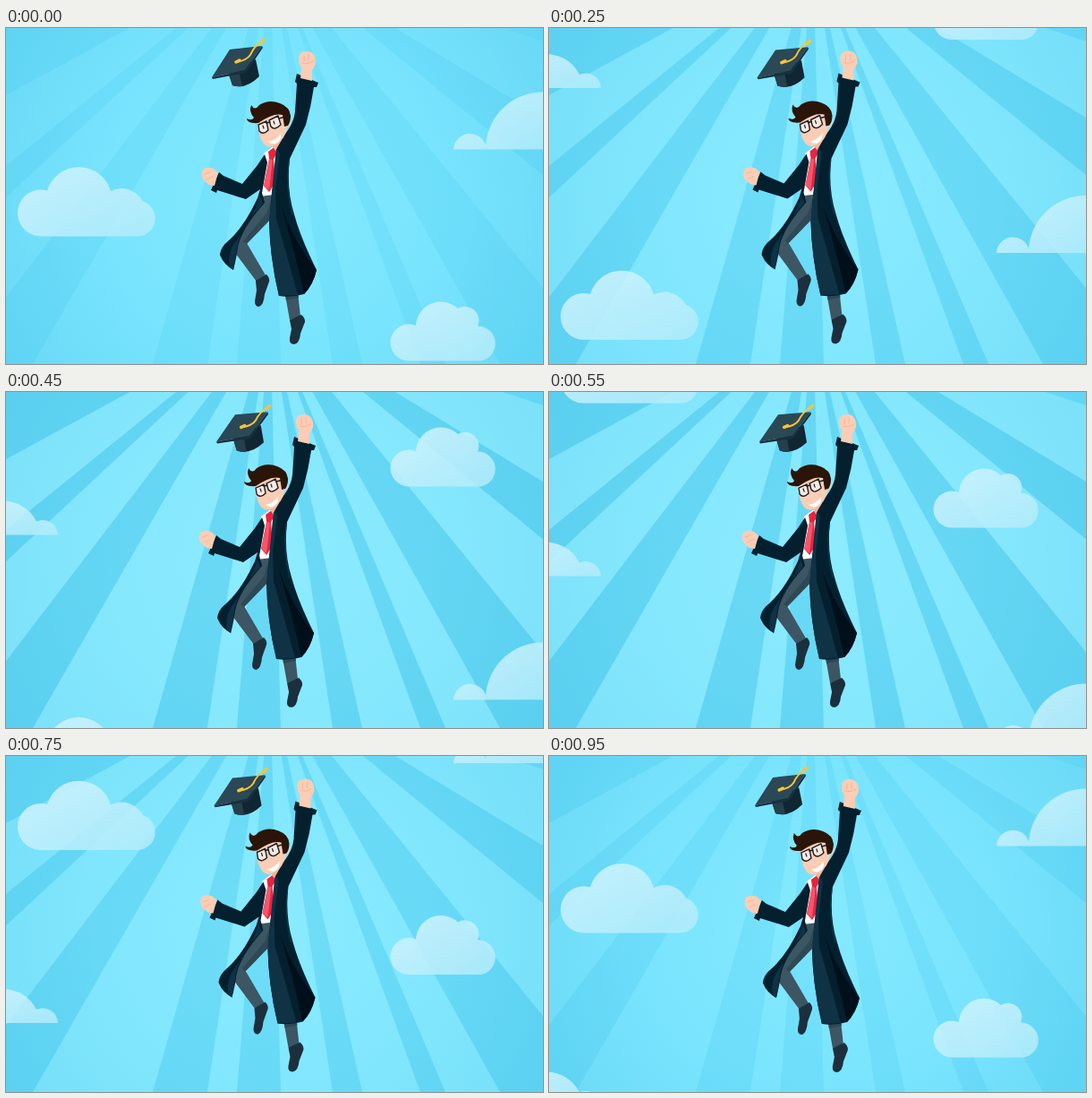
These frames come from a looping animation (600x375 px, 1000 ms). An HTML page:

```html
<!DOCTYPE html>
<html lang="en">
<head>
<meta charset="utf-8">
<title>Graduate</title>
<style>
html, body { margin: 0; width: 100%; height: 100%; overflow: hidden; background: #6bdcfa; }
svg { display: block; width: 100vw; height: 100vh; }
.coat { fill: #04202f; }
.fold { fill: #0f3245; }
.deep { fill: #010f1b; }
.skin { fill: #fbcdb5; }
.shade { fill: #f0b79d; }
.trouser { fill: #3d5664; }
.trouser-dark { fill: #2f4855; }
.shoe { fill: #1b2f3d; }
.hair { fill: #2b1508; }
.line { fill: none; stroke-linecap: round; stroke-linejoin: round; }
</style>
</head>
<body>
<svg viewBox="0 0 600 375" preserveAspectRatio="none">
  <defs>
    <radialGradient id="sky" gradientUnits="userSpaceOnUse" cx="300" cy="190" r="370">
      <stop offset="0" stop-color="#80e8ff"/>
      <stop offset=".5" stop-color="#73e2fd"/>
      <stop offset="1" stop-color="#60d4f4"/>
    </radialGradient>
    <linearGradient id="mist" x1="0" y1="0" x2="1" y2="1">
      <stop offset="0" stop-color="#d4f4fd"/>
      <stop offset="1" stop-color="#b0ebfb"/>
    </linearGradient>
  </defs>
  <rect width="600" height="375" fill="url(#sky)"/>
  <g id="rays"></g>

  <!-- each cloud rests on y = 0 -->
  <g fill="url(#mist)" fill-opacity=".86">
    <path class="cloud" data-y="232.5" d="M38 0A26 26 0 1 1 46-51A37 37 0 0 1 117-50.500A27 27 0 0 1 153-39A20 20 0 0 1 147 0Z"/>
    <path class="cloud" data-y="371.5" d="M450 0A20.500 20.500 0 1 1 458-39.400A28 28 0 0 1 505-58.500A15.500 15.500 0 0 1 527-38.800A19.500 19.500 0 0 1 530 0Z"/>
    <path class="cloud" data-y="135.500" d="M500 0A18.500 18.500 0 0 1 536-5A64 64 0 0 1 601-64V0Z"/>
    <path class="cloud" data-y="-48.500" d="M-42 0A40 40 0 0 1 34-15A17 17 0 0 1 58 0Z"/>
  </g>

  <g id="man">
    <!-- legs -->
    <path class="trouser" d="M284 185L299 184L298 210L269 240L290 276L280 283L256 251Q267 216 284 185Z"/>
    <path class="trouser-dark" d="M297 188L299 210L269 241L265 238L291 207Z"/>
    <path class="shoe" d="M279 282L291 275Q295 279 294 283L289 297Q288 309 283 311Q278 311 278 305L280 293Z"/>
    <path class="trouser" d="M312 298L326 295L329 322L317 326Z"/>
    <path class="trouser-dark" d="M312 298L326 295L327 301L313 304Z"/>
    <path class="shoe" d="M317 326L330 320Q334 323 334 328L329 341Q328 352 322 353Q316 353 317 346L319 336Z"/>
    <!-- shirt and tie -->
    <path fill="#fff" d="M288 140L304 128L300 186L283 188Z"/>
    <path fill="#e8243f" d="M293 138L301 132L302 141L299 146L301 172L294 183L288 176L294 146Z"/>
    <path fill="#f4566a" d="M294 146L298 147L294 181L288 176Z"/>
    <!-- left flap and arm -->
    <path class="coat" d="M289 141L292 150L286 184L289 195Q263 224 259 245Q257 259 254 270Q243 264 239 253Q240 244 249 237Q266 222 281 190L284 180L268 191L236 181L235 184L229 181L238 161L243 165L264 174L281 153Z"/>
    <path class="fold" d="M284 188L287 196Q261 224 258 245L254 270L250 267Q247 252 256 239Q275 215 284 188Z"/>
    <path class="skin" d="M237 161L233 176L227 175L221 170Q217 165 220 158Q224 154 232 157Z"/>
    <path class="line" stroke="#f0b79d" stroke-width="1" d="M222 163L228 161M224 169L230 166"/>
    <!-- main coat and raised arm -->
    <path class="coat" d="M302 128Q321 112 323 93L325 62L323 60L325 51L349 61L347 66L344 66Q341 87 335 108L317 146Q313 179 322 208Q329 234 347 270Q343 287 333 297Q319 301 305 299Q295 258 294 216L297 185L303 146Z"/>
    <path class="fold" d="M302 133L306 140L301 180L302 213Q313 250 326 298L305 299Q295 258 294 216L297 183Z"/>
    <path class="deep" d="M308 200Q322 239 347 270Q343 287 333 297Q326 263 308 200Z"/>
    <path class="line" stroke="#123a4b" stroke-width="1.200" d="M316 149Q312 178 320 208"/>
    <path class="skin" d="M329 56L330 44Q325 37 328 29Q333 24 341 27Q347 31 346 40Q344 45 342 47L342 59Z"/>
    <path class="line" stroke="#f0b79d" stroke-width="1" d="M331 39Q337 41 343 37M333 31L333 37M338 30L338 36"/>
    <!-- head -->
    <path class="shade" d="M295 128L309 116L308 125L301 137Z"/>
    <path class="skin" d="M281 103Q281 119 287 128Q292 135 300 131Q312 125 314 111Q320 107 317 101L311 102L308 91L284 98Z"/>
    <path class="hair" d="M282 106Q269 107 269 101Q275 104 277 100Q271 93 274 86Q278 93 283 86Q294 79 306 84Q317 88 318 98Q318 105 315 109L311 110L309 97Q299 94 282 106Z"/>
    <path fill="#fff" d="M293 127Q302 125 307 118Q308 126 301 129Q297 130 293 127Z"/>
    <g class="line" stroke="#1b2026" stroke-width="1.400">
      <path fill="#fbe9e0" d="M282 108L291 104L293 114Q287 120 283 115ZM294 103L304 98L307 108Q300 115 296 110Z"/>
      <path d="M291 106L295 105M305 101L312 99"/>
    </g>
    <path class="line" stroke="#25333b" stroke-width="1.300" d="M287 109L288 112M299 104L300 107"/>
  </g>

  <g id="cap">
    <path fill="#102632" d="M248 49L253 64Q268 69 283 54L279 35Z"/>
    <path fill="#263f4c" d="M248 49L253 64Q258 66 264 65L260 47Z"/>
    <path fill="#2b4856" d="M230 55L250 24L286 20L267 47Z"/>
    <path fill="#16303d" d="M230 55L267 47L286 20L287 22L268 50L231 57Z"/>
    <path class="line" stroke="#fcc42e" stroke-width="2" d="M258 38Q269 36 273 30Q278 19 285 16"/>
    <path class="line" stroke="#fcc42e" stroke-width="3.500" d="M257 38L261 36M285 16L288 13"/>
  </g>
</svg>
<script>
const $ = id => document.getElementById(id);
const apex = [295, -85];
const floor = 375;

// Bands are given by where their two edges meet the floor line.
function band(a, b, color) {
  const end = x => [apex[0] + (x - apex[0]) * 3, apex[1] + (floor - apex[1]) * 3];
  const p = document.createElementNS("http://www.w3.org/2000/svg", "path");
  p.setAttribute("d", `M${apex}L${end(a)}L${end(b)}Z`);
  p.setAttribute("fill", color);
  $("rays").append(p);
}
const edges = [-1500, -553, -273, -200, -57, 30, 164, 225, 258, 307, 365, 398, 463, 491, 552, 669, 858, 1053, 1700];
for (let i = 0; i < edges.length - 1; i++)
  band(edges[i], edges[i + 1], i % 2 ? "rgba(160,241,255,.42)" : "rgba(80,198,231,.42)");

const clouds = [...document.querySelectorAll(".cloud")];
const fall = 23.1, span = 474;

function draw(now) {
  const n = Math.floor(now % 1000 / 50);
  const p = (1 - Math.cos(n * Math.PI / 10)) / 2;
  for (const c of clouds) {
    const y = (Number(c.dataset.y) + fall * n + span) % span;
    c.setAttribute("transform", `translate(0 ${y.toFixed(2)})`);
  }
  $("rays").style.opacity = 0.3 + 0.7 * p ** 0.6;
  $("man").setAttribute("transform", `translate(${-3 * p} ${-p})`);
  $("cap").setAttribute("transform", `translate(${5.5 * p} ${1.5 * p}) rotate(${2 * p} 260 45)`);
}

let start;
function tick(now) {
  start ??= now;
  draw(now - start);
  requestAnimationFrame(tick);
}
draw(0);
requestAnimationFrame(tick);
</script>
</body>
</html>
```
